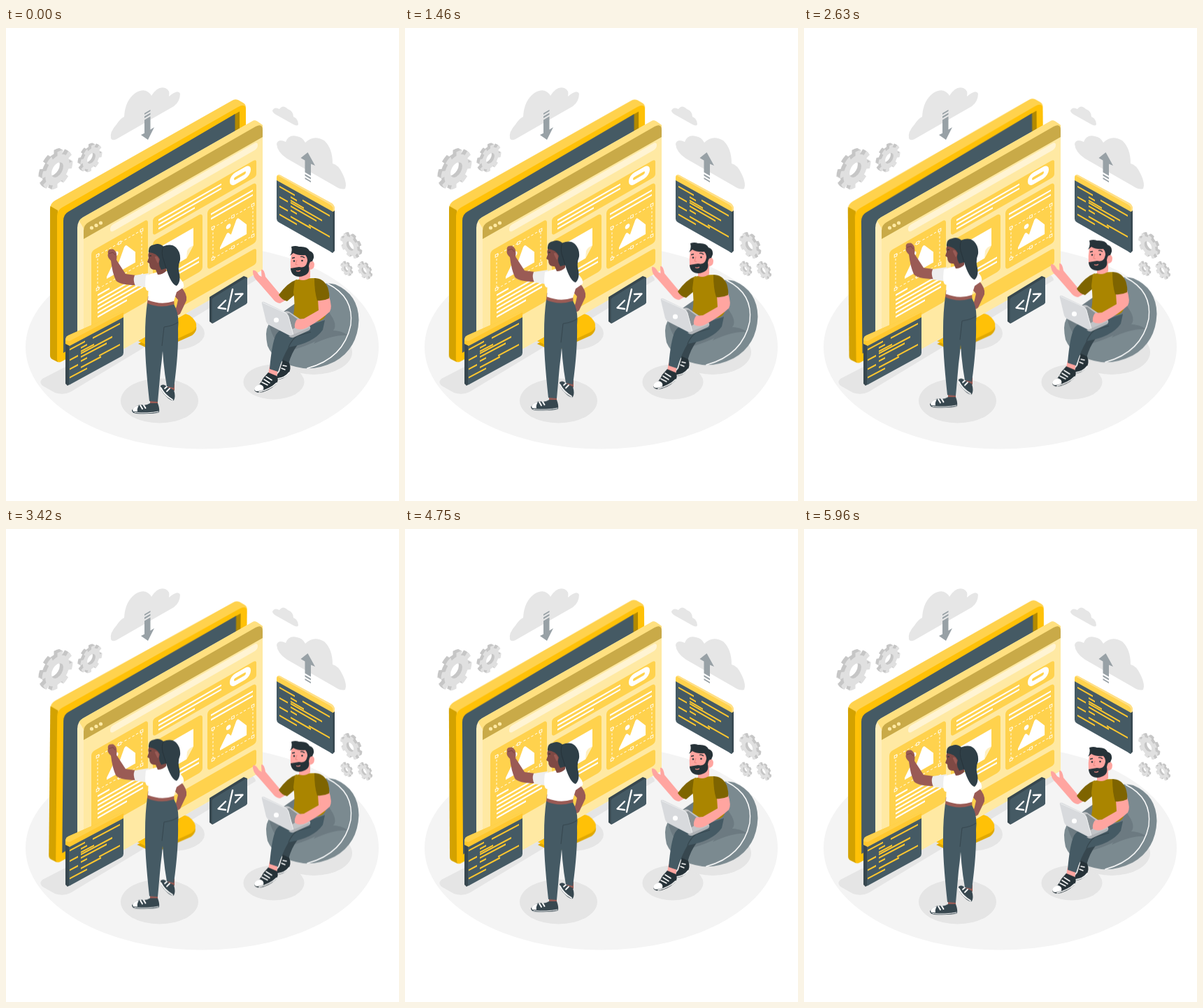
Recreate the animation shown at these times as an HTML page. Size 562 px wide and 677 px high, loop 6000 ms.

```html
<!DOCTYPE html>
<html lang="en">
<head>
<meta charset="utf-8">
<title>Web design team</title>
<style>
  html, body { margin: 0; width: 100%; height: 100%; overflow: hidden; background: #fff; }
  svg { display: block; width: 100vw; height: 100vh; }
  .float { animation: float 6s linear infinite; }
  .sway { animation: sway 3s linear infinite; transform-origin: 203px 290px; }
  @keyframes float { 50% { transform: translateY(-10px); } }
  @keyframes sway {
    0%, 100% { transform: rotate(0deg); }
    25% { transform: rotate(1deg); }
    75% { transform: rotate(-1deg); }
  }
  .line { fill: none; stroke: #fff; stroke-linecap: round; stroke-linejoin: round; }
  .flat { stroke-linecap: butt; }
  .dark { fill: #37474f; }
  .ink { fill: #263238; }
  .slate { fill: #455a64; }
  .gold { fill: #ffd24d; }
  .cloud { fill: #e6e6e6; }
  .arrow { fill: #98a1a6; }
  .skin { fill: #9a5b55; }
  .pink { fill: #ffa5a0; }
</style>
</head>
<body>
<svg viewBox="0 0 562 677">
  <defs>
    <g id="gear" fill="none" stroke="currentColor">
      <circle r="5.8" stroke-width="4"/>
      <circle r="8.7" stroke-width="2.6" pathLength="16" stroke-dasharray="1 1"/>
    </g>
    <g id="hills" fill="#fff">
      <path d="M0 30 L10 15 Q12 13 14 16 L17 20 L25 2 Q27 -1 29 2 L41 18 V33 H0Z"/>
      <circle cx="13" cy="5" r="3.6"/>
    </g>
  </defs>

  <ellipse cx="280.5" cy="456.5" rx="252.5" ry="146" fill="#f4f4f4"/>
  <g fill="#e5e5e5">
    <path d="M52 502 L345 351 Q357 354 357 361 L92 521 Q82 526 70 522 L54 513 Q46 508 52 502Z"/>
    <ellipse cx="238" cy="437" rx="46" ry="24"/>
    <ellipse cx="219.5" cy="533.5" rx="55.5" ry="32"/>
    <ellipse cx="383" cy="506.5" rx="43.5" ry="25"/>
    <ellipse cx="440" cy="464" rx="55" ry="32"/>
  </g>

  <g class="cloud">
    <path d="M150 158 Q148 149 158 138 Q163 130 169 127 Q170 104 185 93 Q200 84 208 97 Q217 82 228 86 Q235 89 233 98 Q246 87 249 94 Q249 105 240 112 L158 159 Q152 162 150 158Z"/>
    <path d="M381 118 Q384 112 391 116 Q396 109 403 116 Q411 119 411 127 Q418 130 418 138 Q417 141 411 138 L386 124 Q381 121 381 118Z"/>
    <path d="M387 166 Q389 158 400 163 Q404 152 416 155 Q424 156 428 164 Q440 152 455 161 Q467 172 467 194 Q475 195 482 210 Q488 223 485 230 Q479 232 470 226 L402 187 Q388 178 387 166Z"/>
  </g>
  <g class="arrow">
    <path d="M198 122 L206.5 117 V119 L198 124Z M198 126.5 L206.5 121.5 V124 L198 129Z M198 131.5 L206.5 126.5 V145.5 L212 142 L203 160 L193 153 L198 150.5Z"/>
    <path d="M431.5 178 L442 197 L436 194.5 V211.5 L427.5 206.5 V189.5 L421.5 186Z M427.5 209 L436 214 V216.5 L427.5 211.5Z M427.5 214 L436 219 V221 L427.5 216Z"/>
  </g>
  <g id="gears"></g>

  <g class="sway">
    <path fill="#e0a800" d="M189 452 L215 438 L250 411 Q262 409 270 422 Q276 432 266 440 L219 461 Q212 463 206 460Z"/>
    <path fill="#ffc107" d="M189 448 L215 433 L250 409 Q262 407 270 419 Q276 428 266 435 L219 457 Q212 459 206 456Z"/>
    <path class="gold" d="M63 259 Q63 251 70 247 L323 104 Q327 101 332 103 L339 107 Q343 109 343 114 V330 L80 477 Q76 480 72 477 L66 474 Q63 472 63 468Z"/>
    <path fill="#d3a200" d="M63.5 255 L74 261 V478 L66 474 Q63 472 63 468 V259Z"/>
    <path fill="#ffc107" d="M73 269 Q73 261 80 257 L332 113 Q343 107 343 117 V330 L80 477 Q73 480 73 474Z"/>
    <path fill="#b28900" d="M326 124 L334 119.5 V210 H326Z"/>
    <path class="slate" d="M82 276 Q82 267 89 263 L327.5 123 V320 L82 465Z"/>
  </g>

  <path fill="#ffeebb" d="M102 286 Q102 276 110 271 L352 133.5 Q356 131 360 134 L367 139 V346 L111 492 L102 487Z"/>
  <path fill="#ffe080" d="M104.5 276 Q107 272.5 110 271 L352 133.5 Q356 131 360 134 L367 139 V150 L113 290Z"/>
  <path fill="#ffe9a3" d="M111 295 L367 150 V346 L111 492Z"/>
  <path fill="#c9aa48" d="M111 290 Q111 282 118 278 L357 141 Q367 136 367 146 V156 L111 302Z"/>
  <g fill="#ffe9a3"><circle cx="122.5" cy="286" r="2.6"/><circle cx="129" cy="282.5" r="2.6"/><circle cx="135.5" cy="279" r="2.6"/></g>

  <g transform="matrix(1 -.573 0 1 111 302)">
    <rect x="38" y="3" width="211" height="10" rx="4.5" fill="#fff4d3"/>
    <g class="gold">
      <rect x="99" y="27" width="148" height="25" rx="4"/>
      <rect x="11" y="24" width="81" height="117" rx="5"/>
      <rect x="99" y="60" width="71" height="82" rx="5"/>
      <rect x="177" y="60" width="70" height="86" rx="5"/>
      <rect x="99" y="154" width="148" height="23" rx="4"/>
    </g>
    <rect x="209" y="29" width="30" height="17" rx="8" fill="#fff"/>
    <rect x="215" y="35.5" width="17" height="4" rx="2" class="gold"/>
    <path fill="#fff" d="M113 74 H157 V99 L147 112 H113Z"/>
    <path fill="#fff0c0" d="M157 99 Q150 98 148 102 L147 112Z"/>
    <use href="#hills" x="33" y="43"/>
    <use href="#hills" transform="translate(195 96) scale(.93)"/>
    <g id="frames"></g>
    <path class="line flat" stroke-width="2.4"
      d="M107 34.5 H197 M107 40.5 H197 M107 46.5 H159 M182 69 H242 M182 75.5 H242
         M20 92 H37 M20 99 H85 M20 105 H85 M20 111 H85 M20 117 H85 M20 123 H62 M113 121 H165 M113 127 H165"/>
  </g>

  <path class="dark" d="M85 452 L91 455 V510 L88 512 L85 509Z"/>
  <path class="slate" d="M90 452 L168 410 V465 Q168 468 165 470 L92 510 Q90 512 90 508Z"/>
  <path fill="#ffc72e" d="M85 447 Q85 442 89 440 L168 405 V414 L91 455 L85 452Z"/>
  <path class="gold" d="M85 447 Q85 442 89 440 L168 405 V407 L91 448Z"/>
  <g class="code" transform="matrix(1 -.53 0 1 86 456)"></g>

  <path class="dark" d="M466 262 L470 260 V319 L467 322 L464 320Z"/>
  <path class="slate" d="M387 216 L467.5 262 V321 Q466 322 464 320 L390 278 Q387 276 387 273Z"/>
  <path class="gold" d="M387 214 Q387 209 392 210.5 L466 251 Q470 254 470 259 V261 L467.5 263 L387 218Z"/>
  <path fill="#ffe08a" d="M388.5 211 Q390 209 392 210.5 L466 251 Q470 254 470 259 V261 L467.5 263 V257 Q466 254 463 252.5Z"/>
  <g class="code" transform="matrix(1 .57 0 1 386 217)"></g>

  <path class="dark" d="M291 385 L340 355 L345 357 V393 L295 423 L291 420Z"/>
  <path class="slate" d="M294.5 389 Q294.5 387 297 385.5 L342 358 Q345 356 345 359 V392 Q345 394 343 395.5 L297 422 Q294.5 423 294.5 420Z"/>
  <path class="line" stroke-width="2.4" d="M314 390 L303.5 400.5 L314 402 M324 374 L317 405 M328 381 L338.5 380.5 L328 391.5"/>

  <g class="float" id="woman">
    <path class="skin" d="M249 369 Q260 381 258 390 L249 409 Q244 414 241 407 L244 398 L246 389 L238 380Z"/>
    <path class="skin" d="M231 509 H241 V519 H231Z M206 531 H217 V541 H206Z"/>
    <path class="dark" d="M221 512 Q225 508 231 514 L240 518 Q243 528 240 533 Q235 534 229 527 Q221 520 221 512Z"/>
    <path class="line" stroke-width="1.8" d="M221.5 515 Q227 526 238 532 M227 516 L231 512.5 M230 520 L234 516"/>
    <path class="dark" d="M180 547 Q184 541 192 539 Q200 541 206 537 L217 537 Q220 545 219 550 Q210 553 186 552 Q180 551 180 547Z"/>
    <path fill="#fff" d="M181 546 Q184 541 190 540 Q187 545 188 549 L182 549Z"/>
    <path class="line" stroke-width="2" d="M192 540 L195 545 M197 540 L199.5 544"/>
    <path class="line" stroke-width="1" d="M184 550.5 Q203 552 218 549"/>
    <path class="slate" d="M222 400 L242 400 Q248 413 246 430 Q247 465 240 515 L230 513 Q224 480 223 440Z"/>
    <path class="slate" d="M202 393 Q220 400 240 395 Q246 406 246 422 Q240 426 226 428 Q225 460 221 490 L217 535 L205 534 Q198 470 199 440 Q199 415 202 393Z"/>
    <path fill="none" stroke="#37474f" stroke-width="1" d="M246 421 Q240 426 226 428 L223 455"/>
    <path class="skin" d="M203 384 L240 386 L240.5 395.5 Q220 402 202 394Z"/>
    <path class="skin" d="M186 354 L171 352 L158 332 Q160 320 153 316.5 Q144 316 146 323 Q144 327 150 333 Q152 350 157 361 Q162 368 186 368Z"/>
    <path fill="none" stroke="#7a4541" stroke-width="1" d="M147 323 L153 321 L156 325"/>
    <path fill="#eee" d="M204 351 L184 354 Q181 361 185 369 L206 372Z"/>
    <path fill="#fff" d="M200 354 Q214 350 226 347 Q244 350 251 361 Q255 366 254 371 L244 378 L240 391 Q222 397 203 389.5 L204 376 Q197 378 200 354Z"/>
    <path fill="#7f4944" d="M206 318 Q202 324 204 329 L202 335 L205 337 Q205 347 214 346 L217 353 Q224 353 229 348 L230 320Z"/>
    <path fill="#2f3f47" d="M204 321 Q203 311 212 310 Q219 307 225 312.5 Q236 308 243 314 Q250 321 249 332 Q245 342 248 352 Q250 364 244 369 Q236 367 229 344 L222 346 Q217 339 220 331 Q216 322 204 321Z"/>
    <path fill="none" stroke="#263238" stroke-width=".8" d="M225 313 Q221 321 226 334 L229 344"/>
    <path class="skin" d="M214 331 Q211 326 216 327 Q221 332 217 337Z"/>
    <path fill="none" stroke="#263238" stroke-width="1.2" d="M205 326 H208"/>
  </g>

  <g class="float" id="man">
    <path fill="#7b8a90" d="M372 438 Q372 424 384 415 Q404 402 428 385 Q448 360 471 367 Q504 381 504.5 418 Q503 459 470 477.5 Q447 489 425 487 Q385 481 374 455 Q372 446 372 438Z"/>
    <path fill="#6c7a81" d="M376 423 Q400 402 428 385 Q450 380 464 410 Q478 430 462 437 Q440 453 405 462 Q383 455 376 423Z"/>
    <path fill="#6c7a81" d="M452 434 Q476 430 489 440 Q470 438 440 452Z"/>
    <path class="line" stroke-width="1.4" d="M460 366 Q498 385 493 425 Q483 473 431 487"/>

    <path class="dark" d="M402 455 L394 476 L404 481 Q408 465 418 452Z"/>
    <path class="ink" d="M396 475 L405 479 Q409 489 403 496 Q394 505 387 502 Q386 497 391 492Z"/>
    <path class="line" stroke-width="1.5" d="M388 502 Q399 501 405 493 M394 487 L399 489 M396 483 L401 484"/>
    <path class="pink" d="M377 484 L389 488 L387 500 L375 495Z"/>
    <path class="ink" d="M375 493 L387 498 Q391 504 386 510 Q376 520 362 522 Q354 521 355 516 Q363 512 368 501Z"/>
    <path fill="#fff" d="M355 516 Q357 512 363 510 Q370 512 368 518 Q355 523 355 516Z"/>
    <path class="line" stroke-width="1.6" d="M366 507 L374 511 M369 503 L377 508 M372 499 L380 504 M362 521 Q378 517 387 508"/>
    <path class="slate" d="M456 418 L415 432 Q394 425 386 439 Q380 452 377 488 L389 492 Q396 470 404 457 Q440 451 453 432Z"/>
    <path fill="none" stroke="#37474f" stroke-width="1.2" d="M404 457 Q408 447 416 441 L436 435"/>

    <path class="pink" d="M401 389 L392 394 Q386 394 381 387 L361 364 Q352 356 353 347 Q357 345 362 354 L365.5 356 L365 346 Q369 344 371 356 L391 380Z"/>
    <path fill="#7e6400" d="M416 360 Q403 364 390 382 Q394 389 402 391 L415 380Z"/>
    <path fill="#aa8500" d="M413 361 Q426 358 442 358 Q454 365 456 385 L457 412 Q452 422 436 420 Q418 417 411 411 Q414 395 411 378Z"/>
    <path fill="#c2c4c7" d="M393 408 Q400 404 405 406 L434 426 Q437 430 433 432 L411 442 L398 434Z"/>
    <path fill="#8b9296" d="M396 410 L405 408 L424 422 L410 431Z"/>
    <path class="pink" d="M446 388 L462 384 Q467 400 463 406 Q450 418 430 429 Q420 434 413 429 Q412 423 416 417 L426 416 L447 404Z"/>
    <path fill="#7e6400" d="M441 358 Q454 358 460 371 Q463 380 462 387 Q454 391 445 390 Q441 377 441 358Z"/>
    <path fill="#d8dadd" d="M366 395 Q365 391 369 392 L400 407 Q403 409 404 412 L411 438 Q411 443 407 441 L376 425 Q373 423 372 420Z"/>
    <path fill="none" stroke="#eef0f1" stroke-width="1" d="M367 393 L400 408 Q403 410 404 413 L411 440"/>
    <path fill="#aeb2b6" d="M408 440 L434 429 Q436 431 433 433 L411 443 Q408 444 404 441Z"/>
    <circle cx="386.5" cy="418" r="3.6" fill="#fff"/>

    <path class="pink" d="M419 346 L435 345 L435 357 Q428 363 419 360Z"/>
    <path class="pink" d="M408 324 Q406 335 407 345 Q413 354 424 352 Q433 350 434 346 Q441 346 441 338 Q440 332 435 334 L436 320 L412 318Z"/>
    <path class="ink" d="M406 326 Q410 321 408 313 Q414 311 419 313 Q431 312 434 319 Q441 321 440 329 L438 334 Q434 333 433 341 Q436 354 420 356 Q408 356 407 344 Q413 343 419 342 Q428 344 430 337 Q433 330 428 325 Q418 326 411 322Z"/>
    <path fill="none" stroke="#ff8f88" stroke-width="1.2" d="M415 347.5 Q418 349 421 347"/>
    <path fill="none" stroke="#263238" stroke-width="1.3" d="M409 329.5 L413 328.5 M421 327.5 Q424 326.5 427 329"/>
    <path fill="none" stroke="#e98780" stroke-width="1" d="M416 332 L414 338.5 L417 339"/>
    <g class="ink"><circle cx="412" cy="333.5" r="1.3"/><circle cx="423.5" cy="333" r="1.3"/></g>
  </g>
</svg>
<script>
  const $ = q => document.querySelector(q);
  const range = n => [...Array(n).keys()];

  // Gears: centre, radius, plane slope, depth direction
  const gears = [
    [73.5, 203, 25.5, -.5, -5], [122, 186.5, 18, -.5, -4],
    [492, 312, 16, .5, 3.5], [486, 345, 9, .5, 2.5], [512, 347.5, 11, .5, 2.5]
  ];
  const gear = (x, y, r, slope, depth) => range(6).map(i => {
    const back = depth * (1 - i / 5), k = r / 10;
    return `<use href="#gear" color="${i < 5 ? '#c6c6c6' : '#e0e0e0'}"
      transform="matrix(${.866 * k} ${slope * k} 0 ${k} ${x + back} ${y - Math.abs(back) * .55})"/>`;
  }).join('');
  $('#gears').innerHTML = gears.map(g => gear(...g)).join('');

  // Dashed picture frames with handles along the top and bottom
  const frame = (x, y, w, h) => {
    const handles = range(6).map(i => [x + i % 3 * w / 2, y + (i > 2 ? h : 0)])
      .map(([u, v]) => `<rect x="${u - 1.8}" y="${v - 1.8}" width="3.6" height="3.6" class="gold" stroke="#fff" stroke-width=".9"/>`);
    return `<rect x="${x}" y="${y}" width="${w}" height="${h}" fill="none" stroke="#fff" stroke-width=".9" stroke-dasharray="3 2.5"/>`
      + handles.join('');
  };
  $('#frames').innerHTML = frame(20, 35, 63, 48) + frame(185, 90, 57, 44);

  // Lines of code: start, end, row
  const rows = [
    [5, 27, 7], [38, 77, 8], [21, 30, 13], [21, 40, 18], [5, 17, 22], [21, 66, 21],
    [21, 58, 26], [21, 30, 32], [5, 17, 35], [47, 77, 38], [21, 50, 41], [5, 30, 47]
  ];
  const code = rows.map(([a, b, y]) => `M${a} ${y}H${b}`).join('');
  document.querySelectorAll('.code').forEach(g => {
    g.innerHTML = `<path d="${code}" stroke="#ffc72e" stroke-width="2.3"/>`;
  });
</script>
</body>
</html>
```
